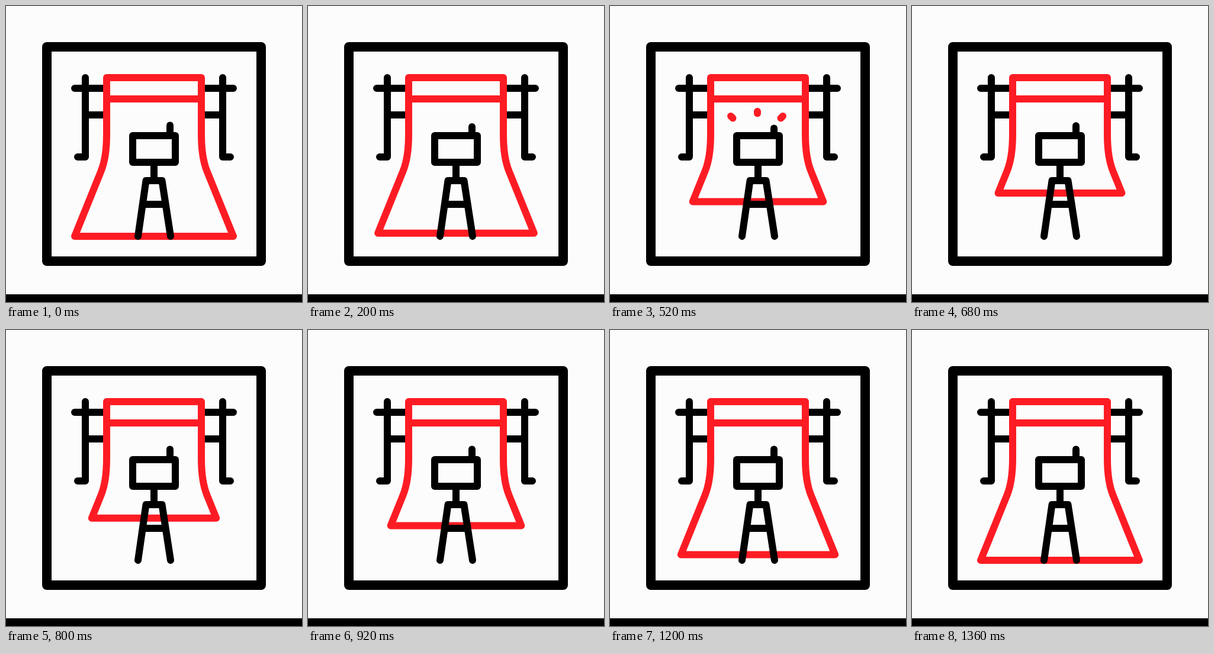
An HTML page for the animation above (1560 ms loop, 500x500 px).

```html
<!DOCTYPE html>
<html lang="en">
<head>
<meta charset="utf-8">
<title>Photo studio icon</title>
<style>
html, body { margin: 0; width: 100%; height: 100%; overflow: hidden; background: #fcfcfc; }
svg { display: block; width: 100vw; height: 100vh; }
path { fill: none; stroke: #000; stroke-width: 12; stroke-linecap: round; stroke-linejoin: round; }
.red { stroke: #fe1c24; }
</style>
</head>
<body>
<svg viewBox="0 0 500 500">
  <defs>
    <path id="stand" d="M121 255H134V121M116 139H168M134 184H168"/>
  </defs>
  <rect y="487" width="500" height="13"/>
  <path d="M69 69H431V431H69Z" stroke-width="16" style="stroke-width:16"/>
  <use href="#stand"/>
  <use href="#stand" transform="matrix(-1 0 0 1 500 0)"/>
  <path id="backdrop" class="red"/>
  <path id="flash" class="red"/>
  <path id="button"/>
  <path d="M214 219H286V264H214ZM250 264V295M223 389L236.5 295H263.5L278 389M231 335H269"/>
</svg>
<script>
const LOOP = 1560, STEP = 40;
const backdrop = document.getElementById('backdrop');
const flash = document.getElementById('flash');
const button = document.getElementById('button');

// Ease-in-out, cubic-bezier(.42, 0, .58, 1)
function ease(x) {
  if (x <= 0) return 0;
  if (x >= 1) return 1;
  let lo = 0, hi = 1, s;
  for (let i = 0; i < 20; i++) {
    s = (lo + hi) / 2;
    const r = 1 - s;
    if (1.26 * s * r * r + 1.74 * s * s * r + s * s * s < x) lo = s; else hi = s;
  }
  return s * s * (3 - 2 * s);
}

const tween = (t, start, end) => ease((t - start) / (end - start));

function draw(t) {
  // The sheet rolls up until 720 ms and back down again
  const y = 315.5 + 73.5 * ease(Math.abs(t - 720) / 640);
  const x = 116 + (389 - y) * 0.405;
  backdrop.setAttribute('d',
    `M170 157V121H330V157H170V217C170 240 167.8 261 160.5 279L${x} ${y}` +
    `H${500 - x}L339.5 279C332.2 261 330 240 330 217V157`);

  const press = tween(t, 120, 280) - tween(t, 560, 720);
  button.setAttribute('d', `M277 ${201.5 + 5 * press}V219`);

  // Three rays shoot outward; a and b are the distances left to travel
  const a = 18 * (1 - tween(t, 200, 520));
  const b = 18 * (1 - tween(t, 200, 660));
  flash.setAttribute('d', t > 200 && t < 660
    ? `M249 ${178 + a}V${178 + b}` +
      `M${204 + a} ${186 + a}L${204 + b} ${186 + b}` +
      `M${292 - a} ${186 + a}L${292 - b} ${186 + b}`
    : '');
}

function tick() {
  draw(Math.floor(performance.now() % LOOP / STEP) * STEP);
  requestAnimationFrame(tick);
}
tick();
</script>
</body>
</html>
```
